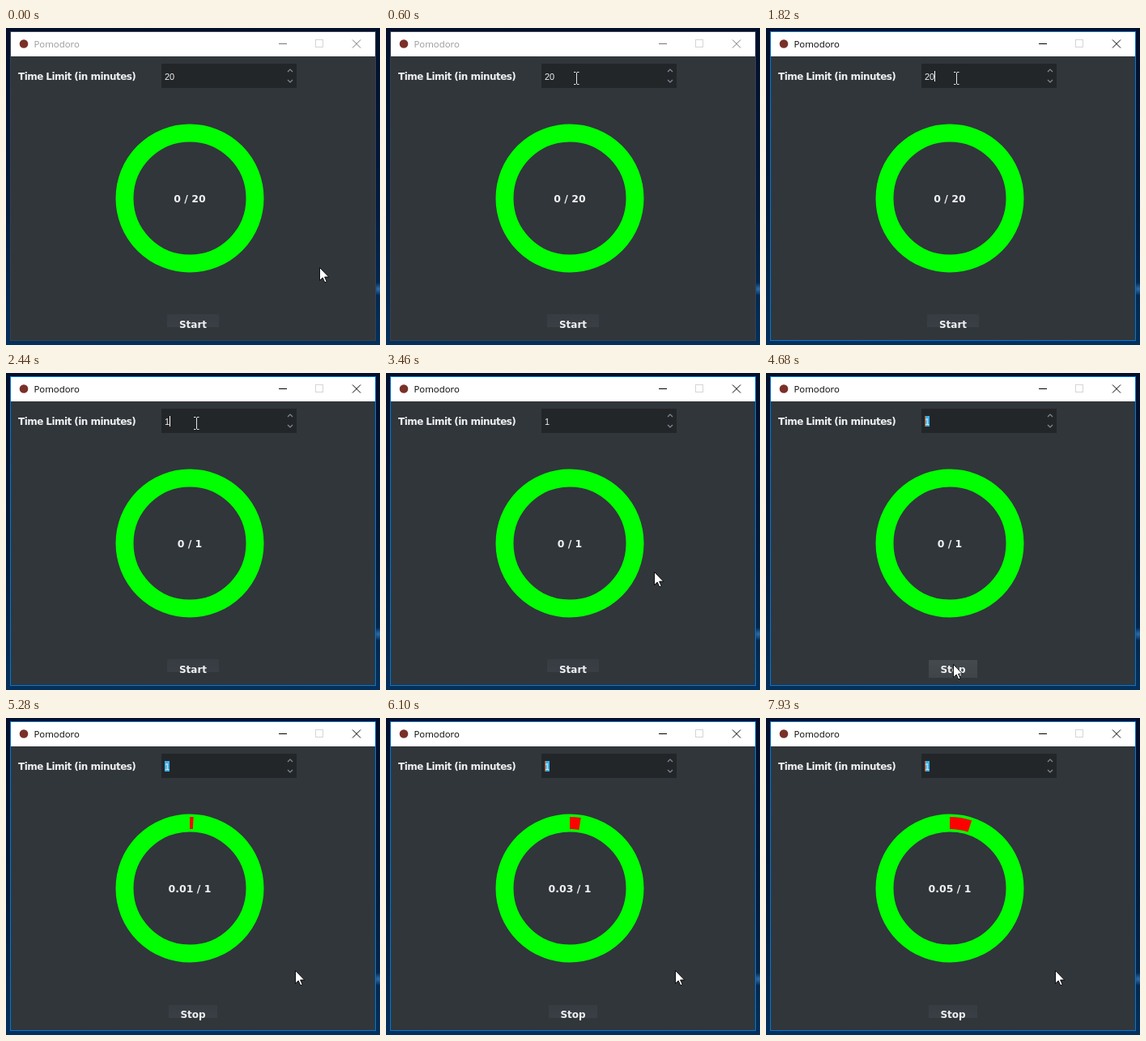
An HTML page for the animation above (8 s loop, 462 by 391 pixels).

```html
<!DOCTYPE html>
<html lang="en">
<head>
<meta charset="utf-8">
<title>Pomodoro timer</title>
<style>
  html, body { margin: 0; width: 100%; height: 100%; overflow: hidden; background: #021a3a; }
  svg { display: block; width: 462px; height: 391px; }
  text { white-space: pre; fill: #eff0f1; }
  .bold { font: bold 12px "DejaVu Sans", sans-serif; }
  .middle { text-anchor: middle; }
  .crisp { shape-rendering: crispEdges; }
</style>
</head>
<body>
<svg viewBox="0 0 462 391">
  <defs>
    <linearGradient id="desk" x1="0" y1="0" x2="0" y2="1">
      <stop offset="0" stop-color="#020f2b"/>
      <stop offset=".55" stop-color="#031b3c"/>
      <stop offset="1" stop-color="#04305c"/>
    </linearGradient>
    <radialGradient id="glow">
      <stop offset="0" stop-color="#2c6fae"/>
      <stop offset="1" stop-color="#2c6fae" stop-opacity="0"/>
    </radialGradient>
    <linearGradient id="idle" x1="0" y1="0" x2="0" y2="1">
      <stop offset="0" stop-color="#373c42"/>
      <stop offset="1" stop-color="#3a3f46"/>
    </linearGradient>
    <linearGradient id="hover" x1="0" y1="0" x2="0" y2="1">
      <stop offset="0" stop-color="#454a4f"/>
      <stop offset="1" stop-color="#3f4449"/>
    </linearGradient>
  </defs>

  <rect width="462" height="391" fill="url(#desk)"/>
  <circle cx="460" cy="322" r="8" fill="url(#glow)"/>

  <!-- window -->
  <g class="crisp">
    <rect id="frame" x="5" y="4" width="452" height="382"/>
    <rect x="6" y="5" width="450" height="30" fill="#fff"/>
    <rect x="6" y="35" width="450" height="350" fill="#31363b"/>
  </g>
  <circle cx="22" cy="19.5" r="5.3" fill="#7a3028"/>
  <text id="title" x="34.5" y="24" style="font: 11.4px 'Open Sans', sans-serif">Pomodoro</text>
  <g id="controls" fill="none">
    <path d="M337 19.5h10M428 14.5l10 10M438 14.5l-10 10"/>
    <rect x="382.5" y="14.5" width="9" height="9" stroke="#d5d5d5"/>
  </g>

  <!-- time limit field -->
  <text class="bold" x="15" y="64" letter-spacing="-.55">Time Limit (in minutes)</text>
  <rect x="192" y="44" width="167" height="30" fill="#232629"/>
  <path d="M348 54l3-3 3 3M348 64l3 3 3-3" fill="none" stroke="#808b98" stroke-width="1.2"/>
  <rect id="selection" class="crisp" x="196" y="53" width="6" height="13" fill="#3daee9"/>
  <text id="field" x="196" y="64" style="font: 11px 'Liberation Sans', Arial, sans-serif"></text>
  <rect id="caret" class="crisp" y="53" width="1" height="13"/>

  <!-- progress -->
  <circle cx="227" cy="210" r="80.5" fill="none" stroke="#0f0" stroke-width="22"/>
  <path id="wedge" fill="#f00"/>
  <text id="count" class="bold middle" x="227" y="215" style="font-size: 12.5px"></text>

  <rect id="button" class="crisp"/>
  <text id="action" class="bold middle" x="231" y="370"></text>

  <!-- pointers -->
  <path id="arrow" d="M.5.5v16l3.7-3.5 2.6 5.8 2.4-1-2.6-5.7h5.1z" fill="#fff" stroke="#000" stroke-width=".9"/>
  <path id="beam" d="M-3-7.500h2.500M1-7.500h2.500M.5-7v14M-3 7.500h2.500M1 7.500h2.500" fill="none" stroke="#e6e6e6"/>
</svg>
<script>
const LOOP = 8000;
const START = 4680;

// Each row: start time, then the value(s) held until the next row.
const pointer = [
  [0, 387, 295], [200, 365, 240], [400, 280, 120], [600, 235, 62],
  [3260, 296, 140], [3460, 331, 245], [3660, 303, 322], [3880, 252, 355],
  [4080, 231, 359], [4880, 300, 338], [5080, 345, 317], [5280, 357, 311]
];
const typed = [[0, '20'], [2040, '2'], [2240, ''], [2440, '1']];
const limits = [[0, 20], [2040, 2], [2440, 1]];
const caretOn = [
  [0, 0], [800, 1], [1220, 0], [1820, 1], [3040, 0], [3660, 1], [4080, 0],
  [START, 1], [5280, 0], [5700, 1], [6300, 0], [6720, 1], [7330, 0], [7930, 1]
];
// Elapsed half seconds
const ticks = [[0, 0], [5080, 1], [5700, 2], [6100, 3], [6720, 4], [7120, 5], [7730, 6]];

const $ = id => document.getElementById(id);
const at = (rows, t) => rows.findLast(row => row[0] <= t).slice(1);
const set = (id, attrs) => {
  for (const name in attrs) $(id).setAttribute(name, attrs[name]);
};
const show = (id, on) => set(id, { visibility: on ? 'visible' : 'hidden' });
const write = (id, text) => {
  if ($(id).textContent !== text) $(id).textContent = text;
};

function wedgePath(angle) {
  const point = r => `${227 + r * Math.sin(angle)} ${210 - r * Math.cos(angle)}`;
  return angle
    ? `M227 122A88 88 0 0 1 ${point(88)}L${point(73)}A73 73 0 0 0 227 137Z`
    : '';
}

function render(t) {
  const [x, y] = at(pointer, t);
  const [text] = at(typed, t);
  const [limit] = at(limits, t);
  const [tick] = at(ticks, t);
  const active = t >= 800;
  const running = t >= START;
  const hovered = t >= 4080 && t < 4880;

  set('frame', { fill: active ? '#0078d7' : '#38424f' });
  $('title').style.fill = active ? '#000' : '#999';
  set('controls', { stroke: active ? '#000' : '#777' });

  write('field', text);
  show('selection', running);
  show('caret', at(caretOn, t)[0]);
  set('caret', {
    x: running ? 196 : 196 + 6 * text.length,
    fill: running ? '#c25116' : '#fff'
  });

  const minutes = tick / 120;
  set('wedge', { d: wedgePath(minutes / limit * 2 * Math.PI) });
  write('count', `${tick ? minutes.toFixed(2) : 0} / ${limit}`);

  set('button', {
    x: running ? 201 : 199,
    y: running ? 354 : 353,
    width: running ? 60 : 64,
    height: hovered ? 22 : 16,
    fill: hovered ? 'url(#hover)' : 'url(#idle)'
  });
  write('action', running ? 'Stop' : 'Start');

  const overField = y < 74;
  show('arrow', !overField);
  show('beam', overField);
  set(overField ? 'beam' : 'arrow', { transform: `translate(${x} ${y})` });
}

const begin = performance.now();
function frame() {
  render((performance.now() - begin) % LOOP);
  requestAnimationFrame(frame);
}
frame();
</script>
</body>
</html>
```
